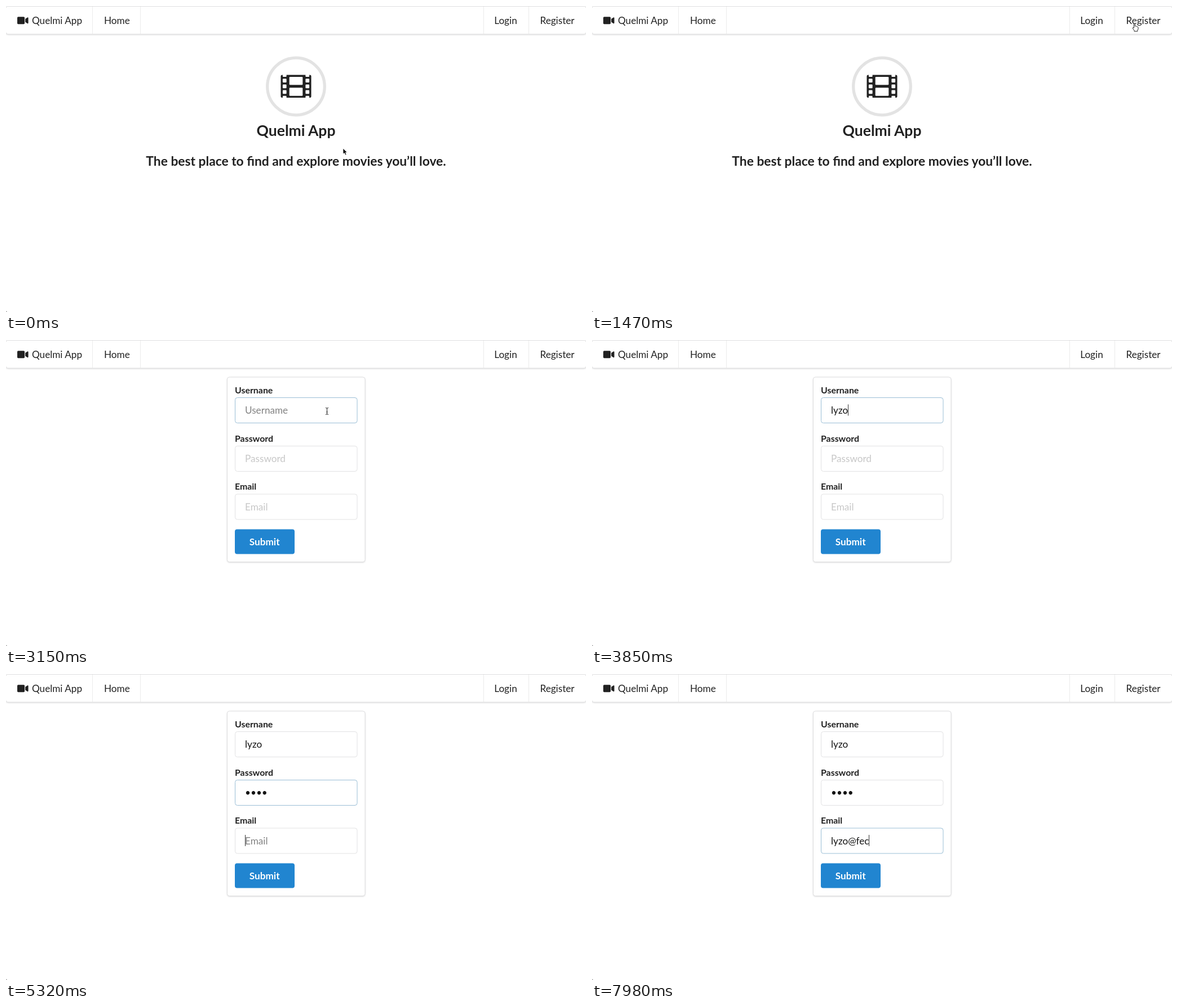
Recreate the animation shown at these times as an HTML page. Size 1029 by 544 pixels, loop 8 s.

```html
<!DOCTYPE html>
<html lang="en">
<head>
<meta charset="utf-8">
<title>Sign-up walkthrough</title>
<style>
  html, body { margin: 0; width: 100%; height: 100%; overflow: hidden; background: #fff; }
  svg { display: block; width: 1029px; height: 544px; }
  text { font: 17.15px Lato, sans-serif; fill: #212121; white-space: pre; }
  .bold { font-weight: 700; }
  .label { font-size: 15.9px; }
  .mid { text-anchor: middle; }
  .line { stroke: #ebebeb; }
  .panel { fill: #fff; stroke: #dededf; filter: drop-shadow(0 1px 1px rgba(34, 36, 38, .15)); }
</style>
</head>
<body>
<svg viewBox="0 0 1029 544">
  <rect class="panel" x="-.5" y=".5" width="1030" height="49.5" rx="4"/>
  <path class="line" d="M153.5 1V50M238.5 1V50M847.5 1V50M927.5 1V50"/>
  <path d="M0 541V544H3Q0 544 0 541Z" fill="#777"/>
  <g transform="translate(20 17) scale(.034)" fill="#212121">
    <rect y="64" width="384" height="384" rx="48"/>
    <path d="M526 102L416 177V335L526 410C547 425 576 410 576 384V128C576 102 547 87 526 102Z"/>
  </g>
  <text x="46" y="32">Quelmi App</text>
  <text x="174" y="32">Home</text>
  <text class="mid" x="886.5" y="32">Login</text>
  <text class="mid" x="978" y="32">Register</text>

  <g id="home">
    <circle cx="514.5" cy="143" r="50.8" fill="none" stroke="#e3e3e3" stroke-width="5.3"/>
    <g id="film" transform="translate(487.5 115.8) scale(.1055)"></g>
    <text class="bold mid" x="514.5" y="230.7" style="font-size:26.5px">Quelmi App</text>
    <text class="bold mid" x="514.5" y="284" style="font-size:22.8px">The best place to find and explore movies you’ll love.</text>
  </g>

  <g id="form">
    <rect class="panel" x="392.5" y="66" width="244.5" height="328.5" rx="4"/>
    <g id="fields"></g>
    <rect x="406" y="336.5" width="106" height="44" rx="4" fill="#2185d0"/>
    <text class="bold mid" x="458.7" y="365" style="fill:#fff">Submit</text>
  </g>

  <g id="pointer">
    <path id="arrow" d="M0 0V10.2L2.4 8.2L4.1 12L6 11.2L4.3 7.5H7.3Z" fill="#000" stroke="#fff" stroke-width=".8"/>
    <path id="hand" d="M-2.6 1V-6Q-1.6 -7.6 -.6 -6V-2Q.6 -3 1.4 -1.7Q2.8 -2.4 3.4 -1Q5 -1.3 5 .4V3L3.8 5.2V7H-2V5.4L-5 1.4Q-4.6 -.6 -2.6 1Z"
      fill="#fff" stroke="#222" stroke-width="1" stroke-linejoin="round"/>
    <path id="beam" d="M-2.5 -6Q0 -6 0 -4.5Q0 -6 2.5 -6M0 -4.5V4.5M-2.5 6Q0 6 0 4.5Q0 6 2.5 6M-1.2 1.5H1.2"
      fill="none" stroke="#222" stroke-width="1"/>
  </g>
</svg>
<script>
const LOOP = 8000, TICK = 70, BLINK = 560, FADE = 100;
const OPEN_FORM = 1540, HIDE_POINTER = 3430;
const $ = id => document.getElementById(id);

function add(parent, tag, attrs, text = '') {
  const el = document.createElementNS('http://www.w3.org/2000/svg', tag);
  for (const k in attrs) el.setAttribute(k, attrs[k]);
  el.textContent = text;
  return parent.appendChild(el);
}

// Film strip: a dark slab with two windows and a row of holes on each side.
const film = $('film');
const slot = (x, y, width, height) => add(film, 'rect', { x, y, width, height, rx: 12, fill: '#fff' });
add(film, 'rect', { y: 64, width: 512, height: 384, rx: 24, fill: '#212121' });
[96, 280].forEach(y => slot(144, y, 224, 136));
[32, 416].forEach(x => {
  for (let y = 32; y < 480; y += 96) slot(x, y, 64, 64);
});

// keys: the time of each keystroke
const fields = [
  { label: 'Usernane', hint: 'Username', value: 'lyzo', y: 102.5, from: 2590, to: 3990,
    keys: [3360, 3500, 3710, 3850] },
  { label: 'Password', hint: 'Password', value: '••••', y: 188.5, from: 3990, to: 5320,
    keys: [4550, 4690, 4970, 5040] },
  { label: 'Email', hint: 'Email', value: 'lyzo@fec', y: 274, from: 5320, to: Infinity,
    keys: [5740, 5950, 6160, 6230, 7070, 7770, 7840, 7980] }
];

for (const f of fields) {
  const g = $('fields');
  add(g, 'text', { class: 'bold label', x: 406, y: f.y - 7.6 }, f.label);
  f.box = add(g, 'rect', { x: 406.5, y: f.y, width: 216.5, height: 45, rx: 4, fill: '#fff' });
  f.text = add(g, 'text', { x: 424, y: f.y + 28.6 });
  f.caret = add(g, 'rect', { y: f.y + 12, width: 1, height: 20, fill: '#333' });
}

const clamp = v => Math.max(0, Math.min(1, v));

function drawField(f, t) {
  const typed = f.keys.filter(k => k <= t);
  const focused = t >= f.from && t < f.to;
  const glow = clamp((t - f.from) / FADE) - clamp((t - f.to) / FADE);
  const mix = (a, b) => Math.round(a + (b - a) * glow);
  f.box.style.stroke = `rgb(${mix(226, 154)},${mix(226, 190)},${mix(227, 214)})`;
  f.text.textContent = typed.length ? f.value.slice(0, typed.length) : f.hint;
  f.text.style.fill = typed.length ? '#151515' : focused ? '#828282' : '#c7c7c7';

  const since = t - (typed.length ? typed[typed.length - 1] : f.from);
  const on = focused && since % (2 * BLINK) < BLINK;
  f.caret.style.display = on ? '' : 'none';
  if (on) f.caret.setAttribute('x', Math.round(424 + (typed.length ? f.text.getComputedTextLength() : 0)));
}

// time, x, y
const path = [
  [0, 598, 253], [70, 685, 198], [140, 755, 154], [350, 800, 124], [420, 840, 99],
  [490, 840, 99], [560, 852, 90], [700, 905, 56], [910, 985, 22], [1050, 990, 20],
  [1190, 974, 38], [1260, 974, 38], [1330, 965, 36], [1400, 965, 36], [1470, 964, 38],
  [1750, 964, 38], [1820, 998, 30], [1890, 760, 112], [1960, 596, 165], [2100, 596, 165],
  [2170, 591, 158], [2450, 571, 129], [2590, 569.5, 126.5]
];

function pointerAt(t) {
  const i = path.findIndex(p => p[0] > t);
  if (i < 0) return path[path.length - 1].slice(1);
  const [a, b] = [path[i - 1], path[i]];
  // The short jumps hold still in between.
  if (t >= 140 && t < 350) return a.slice(1);
  const k = (t - a[0]) / (b[0] - a[0]);
  return [a[1] + (b[1] - a[1]) * k, a[2] + (b[2] - a[2]) * k];
}

function drawPointer(t) {
  const [x, y] = pointerAt(t);
  const kind = y < 50 && x > 847 ? 'hand' : t > OPEN_FORM && y < 148 && x < 623 ? 'beam' : 'arrow';
  $('pointer').setAttribute('transform', `translate(${x} ${y})`);
  $('pointer').style.display = t < HIDE_POINTER ? '' : 'none';
  for (const id of ['arrow', 'hand', 'beam']) $(id).style.display = id === kind ? '' : 'none';
}

function draw(ms) {
  const t = Math.floor((ms % LOOP) / TICK + 1e-6) * TICK;
  $('home').style.display = t < OPEN_FORM ? '' : 'none';
  $('form').style.display = t < OPEN_FORM ? 'none' : '';
  fields.forEach(f => drawField(f, t));
  drawPointer(t);
}

const start = performance.now();
function loop() {
  draw(performance.now() - start);
  requestAnimationFrame(loop);
}
loop();
</script>
</body>
</html>
```
